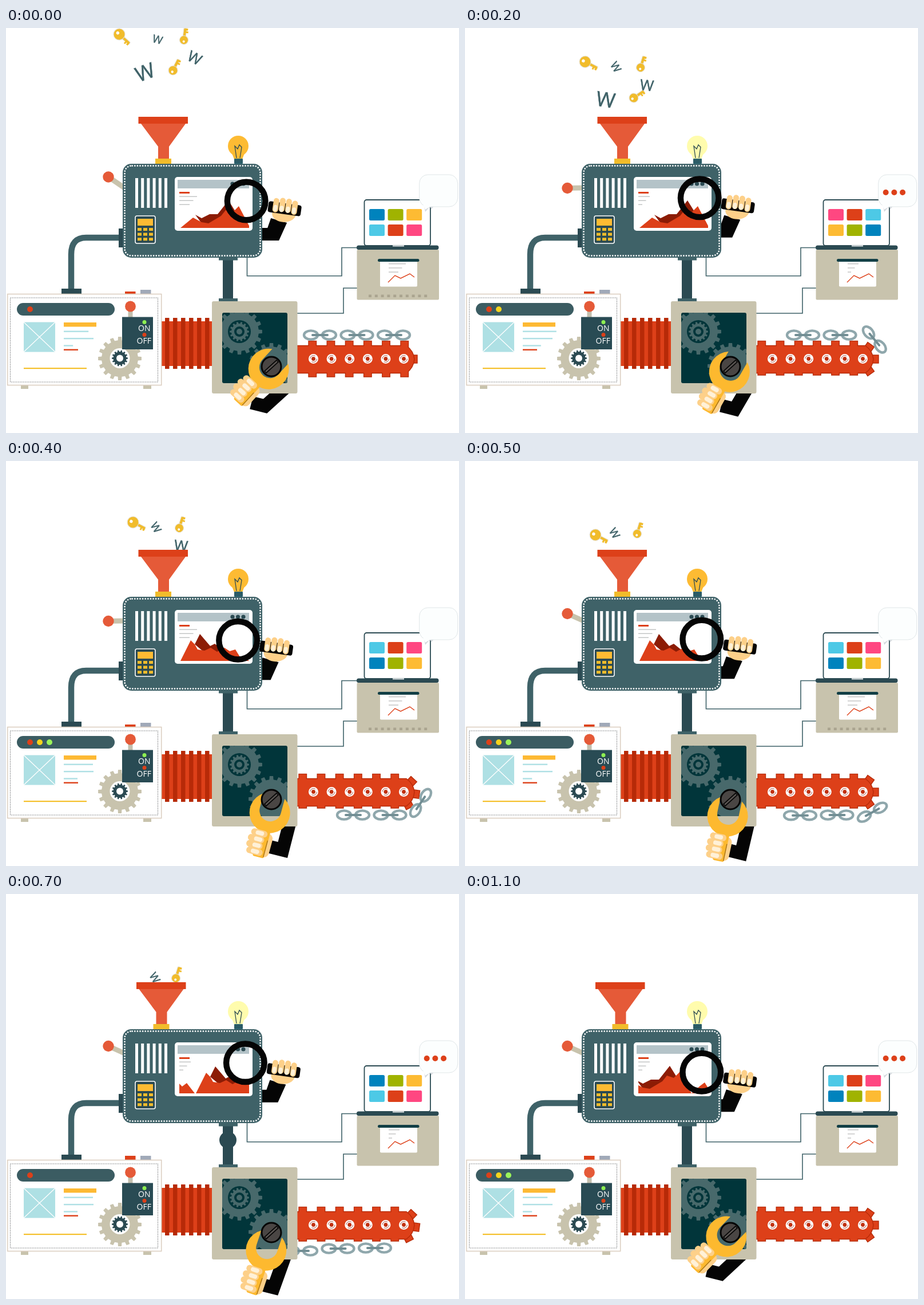
Write an HTML page that moves like this. It is 792 by 707 pixels and loops after 1.2 s.

```html
<!DOCTYPE html>
<html lang="en">
<head>
<meta charset="utf-8">
<title>Content machine</title>
<style>
html, body { margin: 0; width: 100%; height: 100%; overflow: hidden; background: #fff; }
svg { display: block; width: 792px; height: 707px; }
text { font-family: "Open Sans", "Noto Sans", sans-serif; }
</style>
</head>
<body>
<svg id="stage" viewBox="0 0 792 707"></svg>
<script>
const STEP_MS = 100, STEPS = 12, HALF = STEPS / 2;
const C = {
  teal: '#3f6268', dark: '#2b4a52', red: '#dd4019', coral: '#e55a38', deep: '#b72a08',
  amber: '#fdbb33', brass: '#f1bc2b', stone: '#c8c3ad', sky: '#aee0e4', skin: '#fdd089',
  nail: '#fff1d8', night: '#01353a', cog: '#48696b', black: '#050505', shade: '#8c1c05'
};

// Cosine swing that peaks at the given step.
const wave = (s, period, peak, size) => size * Math.cos((s - peak) / period * 2 * Math.PI);

const rect = (x, y, w, h, fill, rx = 0, more = '') =>
  `<rect x="${x}" y="${y}" width="${w}" height="${h}" rx="${rx}" fill="${fill}" ${more}/>`;
const circle = (x, y, r, fill, more = '') => `<circle cx="${x}" cy="${y}" r="${r}" fill="${fill}" ${more}/>`;
const poly = (points, fill) => `<polygon points="${points}" fill="${fill}"/>`;
const line = (d, color, w, more = '') => `<path d="${d}" fill="none" stroke="${color}" stroke-width="${w}" ${more}/>`;
const group = (transform, body) => `<g transform="${transform}">${body}</g>`;
const clip = (id, body) => `<g clip-path="url(#${id})">${body}</g>`;
const repeat = (n, make) => Array.from({ length: n }, (_, i) => make(i)).join('');

function gear(x, y, inner, outer, teeth, fill) {
  const corners = [[-.27, inner], [-.2, outer], [.2, outer], [.27, inner]];
  return poly(repeat(teeth, i => corners.map(([o, r]) => {
    const a = (i + o) / teeth * Math.PI * 2;
    return ` ${(x + r * Math.cos(a)).toFixed(1)},${(y + r * Math.sin(a)).toFixed(1)}`;
  }).join('')), fill);
}

const defs = `<defs>
  <clipPath id="sky">${rect(0, 0, 792, 156, '#000')}</clipPath>
  <clipPath id="chart">${rect(303, 282, 122, 67, '#000')}</clipPath>
  <clipPath id="window">${rect(378, 497, 114, 123, '#000', 3)}</clipPath>
  <clipPath id="pipe">${rect(365, 403, 46, 72, '#000')}</clipPath>
  <clipPath id="right">${rect(509, 480, 283, 227, '#000')}</clipPath>
</defs>`;

function key(r) {
  const len = 10 + r * 1.4, edge = 'stroke="#e4dfd2" stroke-width="1"';
  return rect(r - 2, -2.5, len - r + 2, 5, C.brass, 1, edge) +
    rect(len - 8, 0, 3, 6, C.brass) + rect(len - 3.5, 0, 3.5, 5, C.brass) +
    circle(0, 0, r, C.brass, edge) + circle(-r * .35, 0, r * .27, '#fff');
}

const letter = size => `<text y="${size * .36}" font-size="${size}" text-anchor="middle"
  fill="${C.teal}" stroke="${C.teal}" stroke-width=".5">W</text>`;

const ITEMS = [
  { art: key(10), x: 198, y: 11, drift: 6, turn: [42, 27], sink: 22 },
  { art: key(7.5), x: 311, y: 21, drift: -2, turn: [-83, -73], sink: 10 },
  { art: key(8), x: 292, y: 74, drift: 1.5, turn: [-63, -34], sink: 20 },
  { art: letter(19), x: 265, y: 20, drift: -.7, turn: [15, 58], sink: 10 },
  { art: letter(26), x: 330, y: 52, drift: -6, turn: [27, 6], sink: 20 },
  { art: letter(36), x: 243, y: 77, drift: 1.5, turn: [-20, 8], sink: 20 }
];

// Items drop steadily, then sink more slowly into the funnel.
function falling(s) {
  if (s > 8) return '';
  return clip('sky', ITEMS.map(({ art, x, y, drift, turn: [from, to], sink }) => {
    const top = y + 24 * Math.min(s, 4) + sink * Math.max(0, s - 4);
    const angle = from + (to - from) * Math.min(1, s / 2);
    return group(`translate(${x + drift * s} ${top}) rotate(${angle})`, art);
  }).join(''));
}

function chart(s) {
  const scene = Math.floor(s / 3);
  const x = [390, 339, 366, 359][scene];
  const steep = scene === 1 || scene === 2;
  const hills = steep
    ? poly('-9,320 0,302 18,323 26,319 42,332 10,336', C.shade) +
      poly('-34,349 -16,313 -9,320 -4,329 8,331 19,326 30,333 43,326 52,332 62,329 70,342 87,349', C.red) +
      poly('-66,329 -58,337 -50,331 -36,349 -66,349', C.red)
    : poly('-59,326 -48,332 -34,325 -20,325 -1,301 14,325 -10,345 -45,345', C.shade) +
      poly('-85,349 -63,331 -48,339 -36,341 -14,328 -6,318 6,322 17,311 37,349', C.red) +
      poly('37,349 52,336 60,330 72,349', C.red);
  return clip('chart', group(`translate(${x} 0)`, hills));
}

function bulb(lit) {
  const glass = lit ? '#fffcad' : C.amber;
  return circle(406, 206, 18, glass) + poly('395,219 417,219 413,229 399,229', glass) +
    line('M403 227 L400 206 L405 211 L408 204 L412 208 L409 227', C.dark, 1.3) +
    rect(399, 228, 15, 9, '#2c6470', 1) + line('M399 231 H414 M399 234 H414', C.dark, 1);
}

function funnel(s) {
  return group(`translate(${s < HALF ? 0 : -3.5} 0)`, rect(261, 228, 28, 10, C.brass) +
    poly('236,167 314,167 285,207 285,228 266,228 266,207', C.coral) + rect(231.5, 155, 86.5, 12, C.red));
}

function lever(s) {
  const y = 273 + wave(s, HALF, 3, 13);
  return line(`M179 ${y} L207 279`, C.stone, 9) + circle(179, y, 9.7, C.coral);
}

function machine(s, lit) {
  const w = lit ? 20 : 31;
  return line('M198 366 H140 Q114 366 114 395 V456', C.teal, 10.5) +
    rect(197, 350, 10, 33, C.dark) + funnel(s) + bulb(lit) + lever(s) +
    rect(204, 237, 244, 164, C.teal, 15) +
    rect(207.5, 240.5, 237, 157, 'none', 12, 'stroke="#fff" stroke-width="2.4" stroke-dasharray="2.4 2.2"') +
    repeat(6, i => rect(226 + i * 10.2, 262, 5, 52, '#fff')) +
    rect(226, 328, 35, 48, C.dark, 3, 'stroke="#fff" stroke-width="1.6"') +
    rect(230, 333, 27, 12, C.amber) +
    repeat(9, i => rect(230 + i % 3 * 10, 349 + Math.floor(i / 3) * 8.6, 7, 5, C.brass)) +
    rect(295, 260, 136, 94, '#fff', 5) + rect(300, 265, 125, 15, '#b4c3c8') +
    repeat(3, i => circle(396 + i * 9.5, 272, 3.6, C.dark)) +
    rect(303, 286, 18, 3, C.red) +
    repeat(3, i => rect(303, 293.5 + i * 7, w - i * 6.5, 1.5, '#c4c6c6')) + chart(s);
}

// The magnifier circles twice per loop; its sleeve stays behind the machine.
const withLens = (s, art) =>
  group(`translate(${412 + wave(s, HALF, .3, 8.6)} ${304 + wave(s, HALF, 4.3, 9.7)})`, art);

const sleeve = poly('43,30 71,38 57,69 10,69 10,47 37,47', C.black);
const lens = circle(0, 0, 33.3, 'none', `stroke="${C.black}" stroke-width="10.4"`) +
  `<ellipse cx="66" cy="22" rx="21" ry="15" fill="${C.skin}"/>` +
  group('rotate(8 67 13)', rect(38, 4, 58, 19, C.black, 4) +
    repeat(4, i => rect(46 + i * 11, i % 3 ? -5 : -3, 10, 25, C.skin, 5) +
      rect(47.5 + i * 11, 9, 6.5, 11, C.nail, 3.2)));

function leftBox(s, third) {
  const end = 152 + wave(s, HALF, 2.5, 9);
  const rise = s < HALF ? 0 : 3;
  return rect(97, 455, 35, 9, C.dark) +
    rect(208, 460 - rise, 18.5, 4 + rise, C.red) + rect(235, 457, 18.5, 7, '#a0a9b8') +
    rect(26, 624, 13, 6, C.stone) + rect(240, 624, 14, 6, C.stone) +
    rect(2.7, 464.5, 269, 159, '#fff', 0, 'stroke="#dccfc1" stroke-width="1.6"') +
    rect(7.5, 471, 258, 147, 'none', 0, 'stroke="#55595b" stroke-width="1.1" stroke-dasharray="1.3 1.7"') +
    rect(19, 480, 171, 22, '#3b5c62', 11) +
    [C.red, '#f6d41c', '#9bf45a'].slice(0, third + 1).map((c, i) => circle(42 + i * 17, 491, 5, c)).join('') +
    rect(31, 513.5, 55, 52, C.sky) + line('M31 513.5 L86 565.5 M86 513.5 L31 565.5', '#fff', 1.3) +
    rect(101, 514, 57, 7.5, '#fdb933') +
    [end, 153, end - 27].map((e, i) => rect(101, 528.5 + i * 12.4, e - 101, 2.4, C.sky)).join('') +
    rect(101, 560.5, 25, 2.4, C.red) + rect(31, 593, 110, 2.2, '#f5c02c') +
    gear(199, 577, 32, 38, 16, C.stone) + circle(199, 576.5, 17.5, '#fff') +
    gear(199, 576.5, 11.5, 14, 14, C.dark) + circle(199, 576.5, 6, '#fff') +
    rect(213.5, 494, 8, 12, '#c3bfae') + circle(217.5, 486, 9.4, C.coral) +
    rect(203, 504.5, 54, 56.5, '#294b54') + circle(242, 513.5, 3.5, '#8df052') + circle(242, 535.5, 3.5, C.red) +
    '<text x="231" y="529" font-size="14" fill="#fff">ON</text><text x="228.5" y="551" font-size="14" fill="#fff">OFF</text>';
}

const bellows = rect(271, 512, 90, 78, C.red) + repeat(6, i => rect(278 + i * 14, 506, 7.5, 89, C.deep));

function pipe(s) {
  return rect(379, 401, 18, 76, C.dark) + clip('pipe', circle(388, 406 + 23.5 * (s - HALF), 15, C.dark)) +
    rect(372, 400, 33, 5.5, C.teal) + rect(372, 472, 33, 5.5, C.teal);
}

// Path position p: right along the top, round the end, back underneath.
function chainLink(p) {
  const bend = 697, arc = 115;
  const a = (Math.min(1, Math.max(0, (p - bend) / arc)) - .5) * Math.PI;
  const past = Math.max(0, p - bend - arc);
  const x = Math.min(p, bend) + 32 * Math.cos(a) - past;
  const y = 577 + 41 * Math.sin(a) + Math.max(0, past - 100) / 16;
  const turn = Math.atan2(41 * Math.cos(a), -32 * Math.sin(a)) * 180 / Math.PI + 12 * Math.cos(a);
  const ring = cx => `<ellipse cx="${cx}" cy="0" rx="12" ry="7.6" fill="none" stroke="#8fa7ac" stroke-width="4.4"/>`;
  return group(`translate(${x} ${y}) rotate(${turn})`,
    ring(-16) + ring(16) + line('M-13 0 H13', '#728e94', 4, 'stroke-linecap="round"'));
}

function chains(s) {
  const lead = 549 + 21 * s + (s > 2 ? 140 : 0) + 28 * Math.max(0, s - HALF);
  return clip('right', repeat(3, i => chainLink(lead + i * 64.5)));
}

function belt(s) {
  const phase = s % 3;
  const start = phase ? 512 : 529, low = phase ? 606 : 609;
  const edge = `stroke="${C.deep}" stroke-width="1.4"`;
  const tips = phase ? [-1, 0, 1] : [0];
  const tooth = i => start + i * 32.2;
  return repeat(6, i => rect(tooth(i), 546.5, 13.5, 12, C.red, 0, edge) +
      rect(tooth(i), 596, 13.5, low - 596, C.red, 0, edge)) +
    tips.map(i => group(`translate(692 578) rotate(${i * 55 + (phase === 1 ? 8 : 0)})`,
      rect(18, -7, phase ? 13 : 9, 14, C.red, 0, edge))).join('') +
    `<path d="M508 554.5 H700 Q713 564 714 578 Q713 593 700 602.5 H508 Z" fill="${C.red}" ${edge}/>` +
    repeat(6, i => rect(tooth(i) + .7, 547.2, 12.1, 10, C.red) +
      rect(tooth(i) + .7, 598, 12.1, low - 599, C.red)) +
    repeat(6, i => group(`translate(${537.5 + i * 31.6} 577.5)`, circle(0, 0, 8.5, '#fff') +
      circle(0, 0, 5.8, 'none', 'stroke="#a94b3a" stroke-width="1" stroke-dasharray="12 6"') +
      circle(0, 0, 3.4, '#c1300f'))) +
    chains(s);
}

const centreBox = rect(360, 477, 149.5, 161, C.stone, 3) + rect(378, 497, 114, 123, C.night, 3) +
  clip('window', gear(408, 530, 34, 40, 16, C.cog) + circle(408, 530, 20, C.night) +
    gear(408, 530, 14, 17, 14, C.cog) + circle(408, 530, 9, C.night) + circle(408, 530, 5, C.cog) +
    gear(464, 590, 34, 40, 16, C.cog));

const wrenchY = s => 609 - wave(s, STEPS, .3, 14);

function arm(s) {
  const swing = wave(s, STEPS, 4.3, 19);
  const x = 465 + swing, y = wrenchY(s) + 65, top = 484 + swing * .55;
  const k = 10 / (y - 638);
  return line(`M${top + (top - x) * k} 628 L${x} ${y} L${x - 24} ${y - 6}`, C.black, 23, 'stroke-miterlimit="6"');
}

function wrench(s) {
  const x = 458 + wave(s, STEPS, 2.5, 4.5), turn = 28 + wave(s, STEPS, -.8, 16);
  const metal = '#fdb92f';
  return group(`translate(${x} ${wrenchY(s)}) rotate(${turn})`,
    rect(-12, 36, 29, 42, C.skin, 9) + rect(-10, 28, 20, 52, metal, 3) +
    `<path d="M-19 -30 A35.5 35.5 0 1 0 19 -30 V-4 A19 19 0 0 1 -19 -4 Z" fill="${metal}"/>` +
    line('M9 48 V78', '#9a6a1c', 1.2) +
    repeat(4, i => rect(i % 3 ? -26 : -23, 33 + i * 11, 29, 11.5, C.skin, 5.5) +
      rect(-15, 35 + i * 11, 15, 7.5, C.nail, 3.7))) +
    circle(464, 591, 17, '#4a4644', `stroke="${C.black}" stroke-width="3"`) +
    line('M453 601 L475 581', C.black, 6) + line('M454 600 L474 582', '#5a5552', 2.5);
}

function station(s, third, lit) {
  const upper = ['#0083bd', '#a0b300', C.amber], lower = ['#4dc9e6', C.red, '#ff4781'];
  const tiles = [[...upper, ...lower], [...upper, ...lower].reverse(), [...lower, ...upper]][third];
  const w = !lit && s < HALF ? 30 : 19;
  return rect(626.5, 300, 115.5, 80, '#fff', 4, `stroke="${C.dark}" stroke-width="1.8"`) +
    tiles.map((c, i) => rect(635 + i % 3 * 32.6, i < 3 ? 316 : 343, 27, 20, c, 2.5)).join('') +
    rect(613.5, 387, 143.5, 87.5, C.stone, 2) + rect(613, 379.5, 143.5, 7.5, C.dark, 3.5) +
    rect(676, 379.5, 20, 1.8, '#fff') +
    rect(654, 406, 65, 45.5, '#fff', 2) + rect(650, 403, 72.5, 5, '#123f46', 2.5) +
    repeat(3, i => rect(669, 411 + i * 7.2, w - i * 6.5, 1.3, '#bdbdbd')) +
    line('M668 444 L680 432 L690 437 L706 429 L714 435', C.red, 1.4) +
    (lit ? '' : repeat(10, i => rect(634 + i * 10.8, 465.5, 5, 4.5, '#aaa48f'))) +
    poly('725,304 748,311 744,316 741,312 733,321 731,312', '#d5d9de') +
    rect(722.7, 256, 67, 56, '#fcfefe', 15, 'stroke="#e0e6e8" stroke-width="1"') +
    poly('729,309 746,309 733,317', '#fcfefe') +
    (lit ? repeat(3, i => circle(735.7 + i * 14.7, 287, 5, C.red)) : '');
}

function scene(s) {
  const beat = Math.floor(s / 2), third = beat % 3, lit = beat % 2 === 1;
  const lift = s > HALF ? -1 : 0;
  return defs + falling(s) +
    line('M421.5 400 V432.7 H587 V383.5 H614 M508 498 H590 V454 H614', C.teal, 1.6) +
    withLens(s, sleeve) + pipe(s) + group(`translate(0 ${lift})`, machine(s, lit)) + withLens(s, lens) +
    group(`translate(0 ${-lift})`, bellows) + leftBox(s, third) + belt(s) +
    arm(s) + centreBox + wrench(s) + station(s, third, lit);
}

const stage = document.getElementById('stage');
let shown = -1;
function tick() {
  const step = Math.floor(performance.now() / STEP_MS) % STEPS;
  if (step !== shown) stage.innerHTML = scene(shown = step);
  requestAnimationFrame(tick);
}
tick();
</script>
</body>
</html>
```
